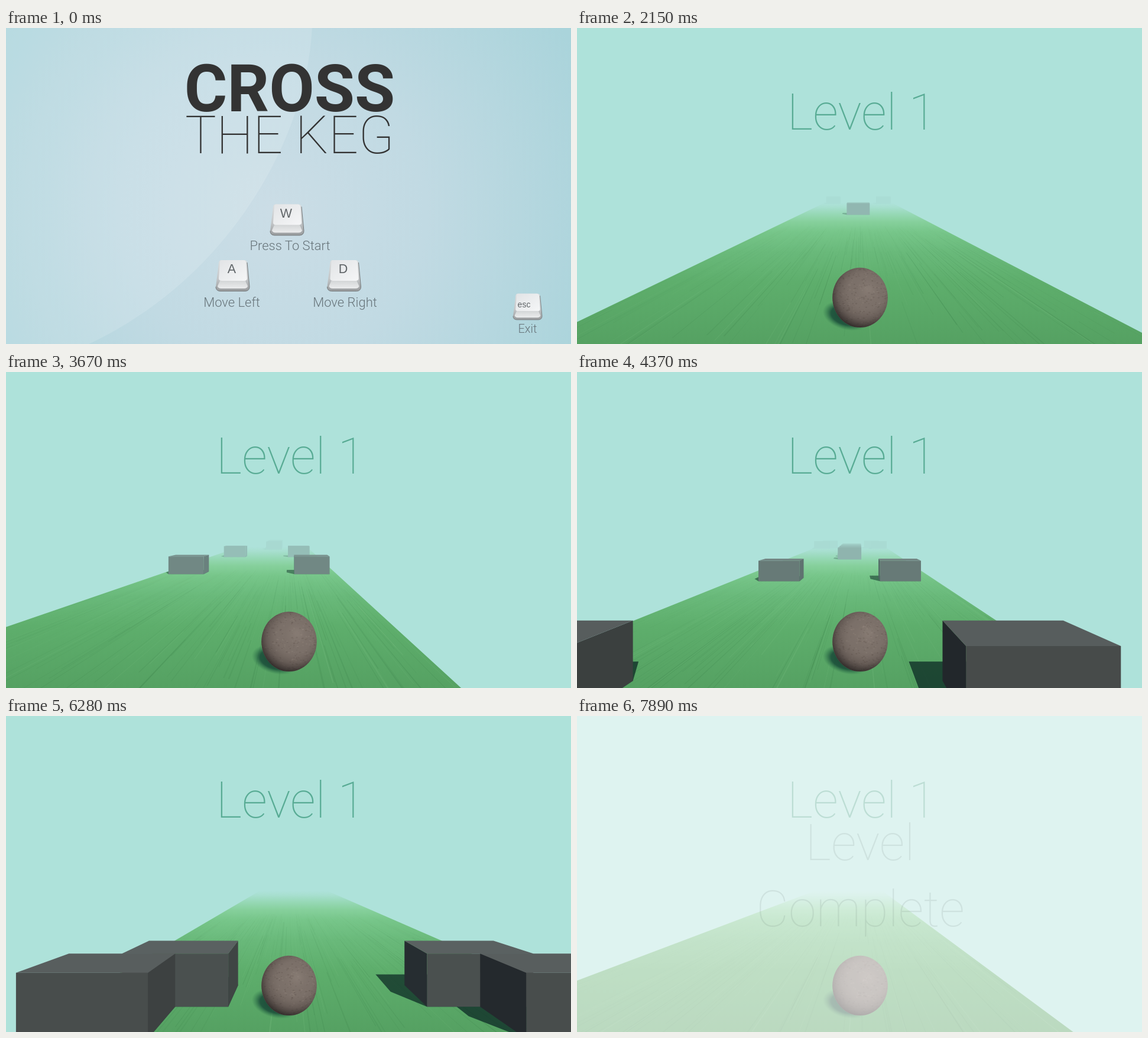
Write an HTML page with a canvas that moves like this. It is 956 px wide and 535 px high and loops after 8 s.

```html
<!DOCTYPE html>
<html lang="en">
<head>
<meta charset="utf-8">
<title>Cross the Keg</title>
<style>
html, body { margin: 0; width: 100%; height: 100%; overflow: hidden; background: #aee2da; }
canvas, svg { position: absolute; left: 0; top: 0; width: 956px; height: 535px; display: block; }
text { font-family: Roboto, sans-serif; text-anchor: middle; }
.thin { font-weight: 100; font-size: 84.5px; }
.label { font-weight: 300; font-size: 22px; fill: #68757b; }
.cap { font-family: "Liberation Sans", Arial, sans-serif; font-size: 21.5px; fill: #5f6467; }
</style>
</head>
<body>
<canvas id="scene" width="956" height="535"></canvas>
<svg viewBox="0 0 956 535">
  <defs>
    <radialGradient id="sky" gradientUnits="userSpaceOnUse" cx="450" cy="310" r="580">
      <stop offset="0" stop-color="#cbdde6"/>
      <stop offset=".45" stop-color="#c1dae3"/>
      <stop offset="1" stop-color="#aad4db"/>
    </radialGradient>
    <linearGradient id="side" x1="0" y1="0" x2="0" y2="1">
      <stop offset="0" stop-color="#dcdfe0"/>
      <stop offset=".6" stop-color="#c3c6c8"/>
      <stop offset="1" stop-color="#989b9d"/>
    </linearGradient>
    <linearGradient id="front" x1="0" y1="0" x2="0" y2="1">
      <stop offset="0" stop-color="#d3d6d7"/>
      <stop offset="1" stop-color="#ebeced"/>
    </linearGradient>
    <linearGradient id="face" x1="0" y1="0" x2="1" y2="1">
      <stop offset="0" stop-color="#e2e4e6"/>
      <stop offset="1" stop-color="#f5f6f7"/>
    </linearGradient>
    <g id="key">
      <path d="M9 1H48Q52 1 53 5L57 46Q57 53 50 53.500H7Q0 53 0 46L5 5Q6 1 9 1Z" fill="url(#side)"/>
      <path d="M53 5L57 46Q57 53 50 53.500H7Q0 53 0 46" fill="none" stroke="#74787a"/>
      <path d="M7 36L3 45Q4 49 9 49H48Q53 49 54 45L50 36Z" fill="url(#front)"/>
      <path d="M10 1H47Q50 1 51 4L53 32Q53 36 48 36H10Q5 36 5 32L7 4Q7 1 10 1Z" fill="url(#face)"/>
    </g>
  </defs>
  <text class="thin" x="481.500" y="172" fill="#58ab94">Level 1</text>
  <rect id="veil" width="956" height="535" fill="#fff" opacity="0"/>
  <g id="done" class="thin" fill="#4c5a58" opacity="0">
    <text x="479" y="244">Level</text>
    <text x="479.500" y="356">Complete</text>
  </g>
  <g id="menu">
    <rect width="956" height="535" fill="url(#sky)"/>
    <path d="M0 0H518C508 190 375 425 140 535H0Z" fill="#fff" opacity=".13"/>
    <g fill="#333">
      <text x="480" y="141" font-size="111" font-weight="700">CROSS</text>
      <text x="480" y="212" font-size="88.500" font-weight="100">THE KEG</text>
    </g>
    <use href="#key" x="447" y="297.500"/>
    <use href="#key" x="355" y="392"/>
    <use href="#key" x="543.500" y="392"/>
    <use href="#key" transform="translate(858 449) scale(.86 .84)"/>
    <text class="cap" x="474" y="321">W</text>
    <text class="cap" x="382" y="415">A</text>
    <text class="cap" x="570.500" y="415">D</text>
    <text class="cap" x="876.500" y="473" style="font-size:14px">esc</text>
    <text class="label" x="480.500" y="376">Press To Start</text>
    <text class="label" x="382" y="472">Move Left</text>
    <text class="label" x="573.500" y="472">Move Right</text>
    <text class="label" x="882.500" y="516" style="font-size:20px">Exit</text>
  </g>
</svg>
<script>
const LOOP = 8000, W = 956, H = 535, CX = 478, CY = 267.5;
const FOCAL = 463, EYE = 2.5, BALL_Z = 5;
const FOG = [174, 226, 218];
const el = id => document.getElementById(id);
const ctx = el('scene').getContext('2d');
const clamp = (v, a = 0, b = 1) => Math.min(b, Math.max(a, v));

// The picture is held between these moments.
const steps = [0];
for (let i = 0; i < 16; i++) steps.push(500 + i * 700 / 15);
for (let i = 0; i < 6; i++) steps.push(1280 + i * 44);
steps.push(1590, 1655, 1720, 2150, 2330, 2530, 2740, 2950, 3150, 3330, 3500, 3670,
  3890, 4130, 4370, 4630, 4890, 5150, 5410, 5590, 5850, 6070, 6280, 6500, 6760,
  6940, 7135, 7330, 7630, 7890);

// Distance run and sideways position over time.
const run = [[500, -10], [1200, 0], [2150, 14.1], [3670, 37.3], [5150, 62.6], [6280, 81.85], [8000, 111]];
const steer = [[500, 0], [1200, .84], [2150, .19], [3300, 2.1], [3670, 2.27], [4300, 1.4], [5150, -.735],
  [5600, -1.5], [5850, -1.4], [6280, -.737], [6760, 1.73], [7330, 1.78], [7890, 1.62]];

// Boxes are 2 wide, 1 high and 1 deep: centre x, front z.
const boxes = [[3.87, 86], [-3.87, 86], [2.87, 87], [-2.87, 87], [-2.7, 62.6], [3.22, 62.6],
  [-3.53, 52.8], [3.6, 52.8], [.08, 37.9]];
for (let i = 0; i < 4; i++) boxes.push([.38, 72.5 + 2 * i]);
boxes.sort((a, b) => b[1] - a[1]);

function along(keys, t) {
  if (t <= keys[0][0]) return keys[0][1];
  for (let i = 1; i < keys.length; i++) {
    const [t0, a] = keys[i - 1], [t1, b] = keys[i];
    if (t <= t1) return a + (b - a) * (t - t0) / (t1 - t0);
  }
  return keys[keys.length - 1][1];
}

function randomizer(seed) {
  return () => (seed = (seed * 16807) % 2147483647) / 2147483647;
}

const rnd = randomizer(77);
const streaks = Array.from({ length: 520 }, () => ({
  x: rnd() * 9.9 - 4.95, z: rnd() * 20, len: 2 + rnd() * 6,
  w: .008 + rnd() * .016, dark: rnd() < .6, a: .03 + rnd() * .05
}));
const grains = Array.from({ length: 900 }, () => ({
  x: rnd() * 2 - 1, turn: rnd() * Math.PI * 2, r: .5 + rnd() * .9, dark: rnd() < .55
}));

const fogAt = z => 1 - Math.exp(-((z / 21) ** 2));
const project = (x, y, z) => {
  const s = FOCAL / z;
  return [CX + x * s, CY + (EYE - y) * s];
};

function poly(points, fill) {
  ctx.fillStyle = fill;
  ctx.beginPath();
  points.forEach(p => ctx.lineTo(p[0], p[1]));
  ctx.fill();
}

function shade(rgb, z) {
  const f = fogAt(z);
  return `rgb(${rgb.map((c, i) => Math.round(c + (FOG[i] - c) * f))})`;
}

function drawFloor(p, dist) {
  const g = ctx.createLinearGradient(0, 296, 0, H);
  [[296, '#aee2da'], [303, '#a8dfd0'], [314, '#98d9b8'], [328, '#86d09c'], [345, '#77c68a'],
   [380, '#69b97a'], [430, '#5eae6c'], [535, '#55a162']]
    .forEach(([y, c]) => g.addColorStop((y - 296) / (H - 296), c));
  const far = EYE * FOCAL / 28, near = EYE * FOCAL / (H - CY);
  poly([project(-5 - p, 0, far), project(5 - p, 0, far), project(5 - p, 0, near), project(-5 - p, 0, near)], g);
  for (const s of streaks) {
    const z = 3 + (((s.z - dist) % 20) + 20) % 20;
    const z1 = Math.min(z + s.len, 17), x = s.x - p;
    if (z1 <= z) continue;
    const alpha = s.a * clamp(1.25 - z / 13);
    poly([project(x, 0, z), project(x + s.w, 0, z), project(x + s.w, 0, z1), project(x, 0, z1)],
      s.dark ? `rgba(25,80,40,${alpha * 1.5})` : `rgba(180,230,180,${alpha * 1.4})`);
  }
}

function drawShadow(x, z) {
  const dx = -.44, dz = .66, l = x - 1, r = x + 1, b = z + 1;
  poly([[l, z], [l + dx, z + dz], [l + dx, b + dz], [r + dx, b + dz], [r, b], [r, z]]
    .map(([u, v]) => project(u, 0, v)), `rgba(14,44,38,${.8 * (1 - fogAt(z))})`);
}

function drawBox(x, z) {
  const l = x - 1, r = x + 1, b = z + 1;
  const wall = (u, rgb) => poly([project(u, 0, z), project(u, 1, z), project(u, 1, b), project(u, 0, b)], shade(rgb, z));
  if (r < 0) wall(r, [56, 59, 59]);
  if (l > 0) wall(l, [30, 34, 38]);
  poly([project(l, 1, z), project(r, 1, z), project(r, 1, b), project(l, 1, b)], shade([85, 89, 89], z));
  poly([project(l, 0, z), project(l, 1, z), project(r, 1, z), project(r, 0, z)], shade([68, 71, 70], z));
}

function drawBall(dist) {
  ctx.save();
  ctx.translate(456, 487);
  ctx.rotate(.25);
  ctx.scale(41, 24);
  let g = ctx.createRadialGradient(0, 0, 0, 0, 0, 1);
  g.addColorStop(0, 'rgba(22,66,52,.95)');
  g.addColorStop(.65, 'rgba(24,74,56,.85)');
  g.addColorStop(1, 'rgba(40,110,70,0)');
  ctx.fillStyle = g;
  ctx.fillRect(-1, -1, 2, 2);
  ctx.restore();

  ctx.save();
  ctx.translate(479, 456.4);
  ctx.beginPath();
  ctx.ellipse(0, 0, 46.8, 50.6, 0, 0, Math.PI * 2);
  ctx.clip();
  ctx.fillStyle = '#7d726b';
  ctx.fillRect(-50, -52, 100, 104);
  for (const s of grains) {
    const a = s.turn + dist * 2, ring = Math.sqrt(1 - s.x * s.x);
    const depth = Math.cos(a) * ring;
    if (depth < .05) continue;
    ctx.fillStyle = s.dark ? 'rgba(60,48,42,.16)' : 'rgba(176,162,150,.16)';
    ctx.beginPath();
    ctx.ellipse(s.x * 46, Math.sin(a) * ring * 50, s.r * 1.3, s.r * (.3 + depth * .7), 0, 0, 7);
    ctx.fill();
  }
  g = ctx.createRadialGradient(14, -14, 4, 6, -7, 60);
  g.addColorStop(0, 'rgba(155,142,132,.28)');
  g.addColorStop(.45, 'rgba(100,88,80,.08)');
  g.addColorStop(.75, 'rgba(55,46,43,.34)');
  g.addColorStop(1, 'rgba(28,24,24,.82)');
  ctx.fillStyle = g;
  ctx.fillRect(-50, -52, 100, 104);
  ctx.restore();
}

function draw(time) {
  const t = steps.filter(s => s <= time).pop();
  const dist = along(run, t), p = along(steer, t);
  ctx.fillStyle = `rgb(${FOG})`;
  ctx.fillRect(0, 0, W, H);
  drawFloor(p, dist);
  const shown = boxes.map(([x, z]) => [x - p, z - dist]).filter(([, z]) => z > .4 && z < 46);
  shown.forEach(b => drawShadow(...b));
  shown.filter(b => b[1] > BALL_Z).forEach(b => drawBox(...b));
  drawBall(dist);
  shown.filter(b => b[1] <= BALL_Z).forEach(b => drawBox(...b));

  const end = clamp((t - 7330) / 560);
  el('veil').setAttribute('opacity', end * .6);
  el('done').setAttribute('opacity', end * .1);
  el('menu').setAttribute('opacity', 1 - clamp((t - 450) / 400));
}

const start = performance.now();
function tick() {
  draw((performance.now() - start) % LOOP);
  requestAnimationFrame(tick);
}
tick();
</script>
</body>
</html>
```
